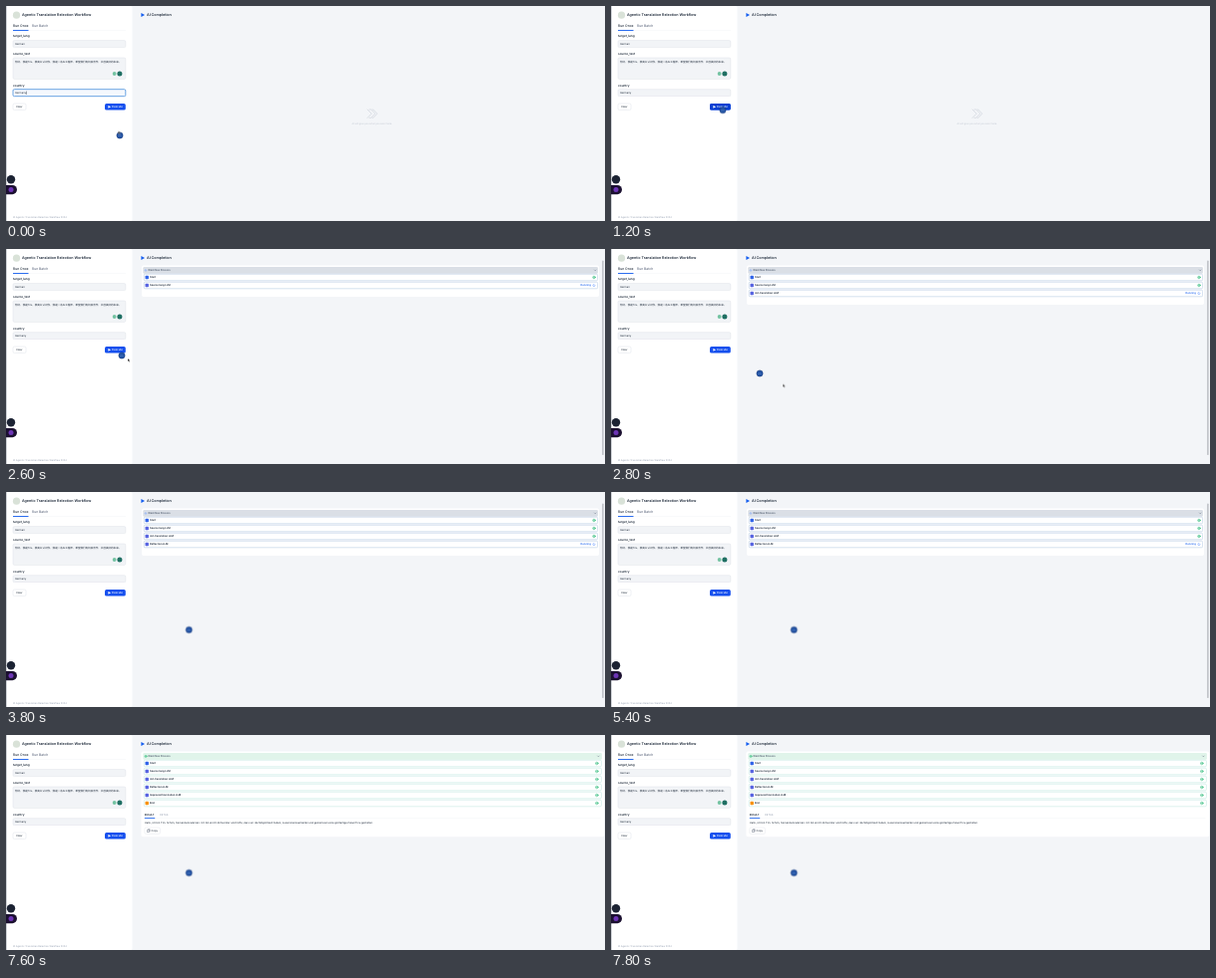
Recreate the animation shown at these times as an HTML page. Size 600 by 216 pixels, loop 8 s.

```html
<!DOCTYPE html>
<html lang="en">
<head>
<meta charset="utf-8">
<title>Translation workflow run</title>
<style>
html, body { margin: 0; width: 100%; height: 100%; overflow: hidden; background: #f3f5f8; }
svg { display: block; width: 600px; height: 216px; }
text {
  font-family: Inter, "Noto Sans CJK SC", "Noto Sans CJK", sans-serif;
  font-size: 2.6px; fill: #1d2939; text-rendering: geometricPrecision; white-space: pre;
}
.title { font-size: 3.65px; font-weight: 600; }
.tab { font-size: 3.35px; font-weight: 500; }
.label { font-size: 3.05px; font-weight: 600; }
.node { font-size: 2.55px; font-weight: 600; }
.muted { fill: #98a2b3; }
.blue { fill: #155eef; }
.field { fill: #f2f4f7; stroke: #dfe3e9; stroke-width: .5; }
.line { fill: none; stroke-width: .5; stroke-linecap: round; stroke-linejoin: round; }

/* every state switches hard on the shared 8 s clock */
.focus, .blur, .hover, .empty, .load, .run, .row3, .row4, .wait2, .ok2, .wait3, .ok3,
.done, .ball, .arrow, .card { animation: 8s step-end infinite; }
.focus { animation-name: focus; }
.blur { animation-name: blur; }
.hover { animation-name: hover; }
.empty { animation-name: empty; }
.load { animation-name: load; }
.run { animation-name: run; }
.row3, .ok2 { animation-name: third; }
.row4, .ok3 { animation-name: fourth; }
.wait2 { animation-name: wait2; }
.wait3 { animation-name: wait3; }
.done { animation-name: done; }
.ball { animation-name: ball; }
.arrow { animation-name: arrow; }
.card { animation-name: card; }

@keyframes focus { 0% { opacity: 1 } 7.5%, 100% { opacity: 0 } }
@keyframes blur { 0% { opacity: 0 } 7.5%, 100% { opacity: 1 } }
@keyframes hover { 0% { opacity: 0 } 15% { opacity: 1 } 32.5%, 100% { opacity: 0 } }
@keyframes empty { 0% { opacity: 1 } 30%, 100% { opacity: 0 } }
@keyframes load { 0% { opacity: 0 } 30% { opacity: 1 } 32.5%, 100% { opacity: 0 } }
@keyframes run { 0% { opacity: 0 } 32.5% { opacity: 1 } 95%, 100% { opacity: 0 } }
@keyframes third { 0% { opacity: 0 } 35%, 100% { opacity: 1 } }
@keyframes fourth { 0% { opacity: 0 } 47.5%, 100% { opacity: 1 } }
@keyframes wait2 { 0% { opacity: 1 } 35%, 100% { opacity: 0 } }
@keyframes wait3 { 0% { opacity: 1 } 47.5%, 100% { opacity: 0 } }
@keyframes done { 0% { opacity: 0 } 95%, 100% { opacity: 1 } }
@keyframes card { 0% { height: 31.5px } 35% { height: 39.5px } 47.5%, 100% { height: 47.5px } }
@keyframes ball {
  0% { transform: translate(114px, 130px); opacity: 1 }
  7.5% { transform: translate(112.5px, 103.5px); opacity: 1 }
  15% { transform: translate(112px, 104.6px); opacity: 1 }
  17.5% { transform: translate(110px, 102px); opacity: 0 }
  32.5% { transform: translate(116px, 107px); opacity: 1 }
  35% { transform: translate(149px, 125px); opacity: 1 }
  37.5% { transform: translate(182px, 138px); opacity: 1 }
  40%, 100% { transform: translate(183.3px, 138.5px); opacity: 1 }
}
@keyframes arrow {
  0% { transform: translate(112.4px, 125.6px); opacity: 1 }
  7.5% { transform: translate(111px, 101.5px); opacity: 0 }
  17.5% { transform: translate(108.8px, 101px); opacity: 1 }
  32.5% { transform: translate(122px, 110px); opacity: 1 }
  35% { transform: translate(172.2px, 135.6px); opacity: 1 }
  37.5%, 100% { transform: translate(183px, 138px); opacity: 0 }
}
</style>
</head>
<body>
<svg viewBox="0 0 600 216">
  <defs>
    <g id="tick" class="line" stroke="#17b26a">
      <circle r="1.3"/><path d="M-.6 0l.4.5.8-.9"/>
    </g>
    <path id="spin" class="line" stroke="#528bff" d="M1.1 0A1.1 1.1 0 1 1 0-1.1"/>
    <path id="play" d="M0-1.9L3.6 0 0 1.9z"/>
  </defs>

  <rect width="600" height="216" fill="#f3f5f8"/>
  <path d="M0 0H125Q126.5 0 126.5 1.5V214.5Q126.5 216 125 216H0z" fill="#fff"/>
  <rect width=".8" height="216" fill="#c3c7ce"/>

  <!-- sidebar -->
  <circle cx="10.5" cy="9.2" r="3.6" fill="#d9e2d8"/>
  <text class="title" x="16" y="10.4">Agentic Translation Relection Workflow</text>
  <text class="tab" x="7" y="21.4">Run Once</text>
  <text class="tab" x="26" y="21.4" style="fill:#667085">Run Batch</text>
  <rect x="7" y="24.6" width="113" height=".3" fill="#eaecf0"/>
  <rect class="blue" x="7" y="24" width="15.5" height=".9"/>

  <text class="label" x="7" y="31.2">target_lang</text>
  <rect class="field" x="7" y="34.6" width="112.8" height="7" rx="1.3"/>
  <text x="9" y="39.1">German</text>

  <text class="label" x="7" y="48.8">source_text</text>
  <rect class="field" x="7" y="52" width="112.8" height="21.4" rx="1.3"/>
  <text lang="zh" x="9" y="56.6" style="font-size:2.55px">你好，我是Tim，很高兴认识你，我是一名AI工程师，希望我们有机会合作，共创美好的未来。</text>
  <circle cx="108.6" cy="68" r="1.9" fill="#74c3a2"/>
  <circle cx="113.9" cy="68" r="2.5" fill="#1f6f63"/>

  <text class="label" x="7" y="80.6">country</text>
  <rect class="field blur" x="7" y="83.7" width="112.8" height="7" rx="1.3"/>
  <g class="focus">
    <rect x="7" y="83.7" width="112.8" height="7" rx="1.3" fill="#f5f8fd" stroke="#5b9ae0" stroke-width=".9"/>
    <rect x="20.2" y="85.6" width=".4" height="3.3" fill="#1d2939"/>
  </g>
  <text x="9" y="88.2">Germany</text>

  <rect x="7" y="98" width="13" height="6.6" rx="1.6" fill="#fff" stroke="#dfe3e9" stroke-width=".5"/>
  <text x="10" y="102.2">Clear</text>
  <rect x="99" y="98" width="20.8" height="6.6" rx="1.7" fill="#1650ee"/>
  <rect class="hover" x="99" y="98" width="20.8" height="6.6" rx="1.7" fill="#0a40d2"/>
  <use href="#play" transform="translate(102.4 101.3) scale(.75)" fill="#fff"/>
  <text x="106.3" y="102.3" style="fill:#fff;font-weight:500;font-size:2.75px">Execute</text>

  <circle cx="5" cy="174.2" r="4.2" fill="#1c2333"/>
  <path d="M0 180H6.4A4.6 4.6 0 0 1 6.4 189.2H0z" fill="#1b1030"/>
  <circle cx="5" cy="184.6" r="2.5" fill="#6d35b5"/>
  <text class="muted" x="7" y="212.6" style="font-size:2.4px">© Agentic Translation Relection Workflow 2024</text>

  <!-- main pane -->
  <use href="#play" x="135.4" y="9" class="blue"/>
  <text class="title" x="141" y="10.3">AI Completion</text>

  <g class="empty">
    <path class="line" stroke="#d3d8e0" style="stroke-width:.8" d="M362 104l4.2 4.2-4.2 4.2M364 104h1.6l4.2 4.2-4.2 4.2H364M367 104h.8l4 4.2-4 4.2H367"/>
    <text x="366.7" y="118.6" text-anchor="middle" style="font-size:2.4px;fill:#c3c9d3">AI will give you what you want here.</text>
  </g>
  <g class="load line" stroke="#98a2b3">
    <path d="M365.4 109.8l1 .8M367.2 111.4l1.3 1M368.6 111.3v1.2h-1.4"/>
  </g>

  <g class="run">
    <rect class="card" x="136" y="16.6" width="458" height="47.5" rx="1.8" fill="#fff"/>
    <rect x="137.3" y="18" width="455.6" height="6.8" rx="1.2" fill="#dadfe6"/>
    <use href="#spin" x="140" y="21.4" style="stroke:#98a2b3" transform="translate(28 4.28) scale(.8)"/>
    <text x="142.2" y="22.4" style="font-weight:500;fill:#475467">Workflow Process</text>
    <path class="line" stroke="#667085" d="M589.4 21l.8.8.8-.8"/>
    <g id="running"></g>
    <rect x="597" y="11.5" width="1.7" height="195.5" rx=".85" fill="#c2c5ca"/>
  </g>

  <g class="done">
    <rect x="135.4" y="16.6" width="463.8" height="85.6" rx="1.8" fill="#fff"/>
    <rect x="137.3" y="18" width="459.6" height="6.8" rx="1.2" fill="#e0f4ea"/>
    <use href="#tick" transform="translate(140 21.4) scale(.85)"/>
    <text x="142.2" y="22.4" style="font-weight:500;fill:#475467">Workflow Process</text>
    <path class="line" stroke="#667085" d="M592.6 21l.8.8.8-.8"/>
    <g id="finished"></g>
    <rect x="138.6" y="83.6" width="457" height=".3" fill="#eaecf0"/>
    <text class="node" x="138.8" y="80.5">RESULT</text>
    <rect class="blue" x="138.8" y="83" width="10.4" height=".8"/>
    <text class="muted" x="154" y="80.5">DETAIL</text>
    <text x="138.8" y="89.2" style="font-size:2.55px">Hallo, ich bin Tim. Schön, Sie kennenzulernen. Ich bin ein KI-Entwickler und hoffe, dass wir die Möglichkeit haben, zusammenzuarbeiten und gemeinsam eine großartige Zukunft zu gestalten.</text>
    <rect x="138.8" y="93" width="15.6" height="6.4" rx="1.4" fill="#fff" stroke="#e4e7ec" stroke-width=".5"/>
    <path class="line" stroke="#475467" style="stroke-width:.4" d="M141.8 95.3h1.6v2.2h-1.6zM142.6 94.7h1.5v2.1"/>
    <text x="145.6" y="97.2">Copy</text>
  </g>

  <!-- pointer -->
  <g class="ball">
    <circle r="3.1" fill="#2455a6" stroke="#173a7c" stroke-width=".6"/>
    <path d="M-1.3.3Q0-.6 1.3.3" class="line" stroke="#5f88c8"/>
  </g>
  <path class="arrow" d="M0 0V3l.7-.6.5 1.1.6-.3-.5-1h1z" fill="#111" stroke="#fff" stroke-width=".25"/>
</svg>
<script>
const names = ["Start", "Source lang LLM", "init-translation LLM", "Reflection LLM", "Improved translation LLM", "End"];
const colors = { Start: "#2e62e8", End: "#f79009" };

const tick = (x, y, cls = "") => `<g class="${cls}"><use href="#tick" x="${x}" y="${y}"/></g>`;
const wait = (y, cls = "") => `<g class="${cls}">
  <text class="blue" x="575.6" y="${y + .9}" style="font-weight:500">Running</text>
  <use href="#spin" x="589" y="${y}"/></g>`;

function row(i, right, edge, status, cls = "") {
  const y = 28.5 + 8 * i, name = names[i];
  return `<g class="${cls}">
    <rect x="138.2" y="${y - 3.3}" width="${right - 138.2}" height="6.6" rx="1.2" fill="#fff" stroke="${edge}" stroke-width=".6"/>
    <rect x="139.5" y="${y - 1.7}" width="3.4" height="3.4" rx=".8" fill="${colors[name] || "#5562e0"}"/>
    <text class="node" x="144" y="${y + .9}">${name}</text>${status(y)}</g>`;
}

const live = [
  ["", y => tick(589, y)],
  ["", y => wait(y, "wait2") + tick(589, y, "ok2")],
  ["row3", y => wait(y, "wait3") + tick(589, y, "ok3")],
  ["row4", y => wait(y)]
];
document.getElementById("running").innerHTML =
  live.map(([cls, status], i) => row(i, 592.6, "#b7cbe3", status, cls)).join("");
document.getElementById("finished").innerHTML =
  names.map((_, i) => row(i, 596.4, "#c4e8e2", y => tick(591.8, y))).join("");
</script>
</body>
</html>
```
